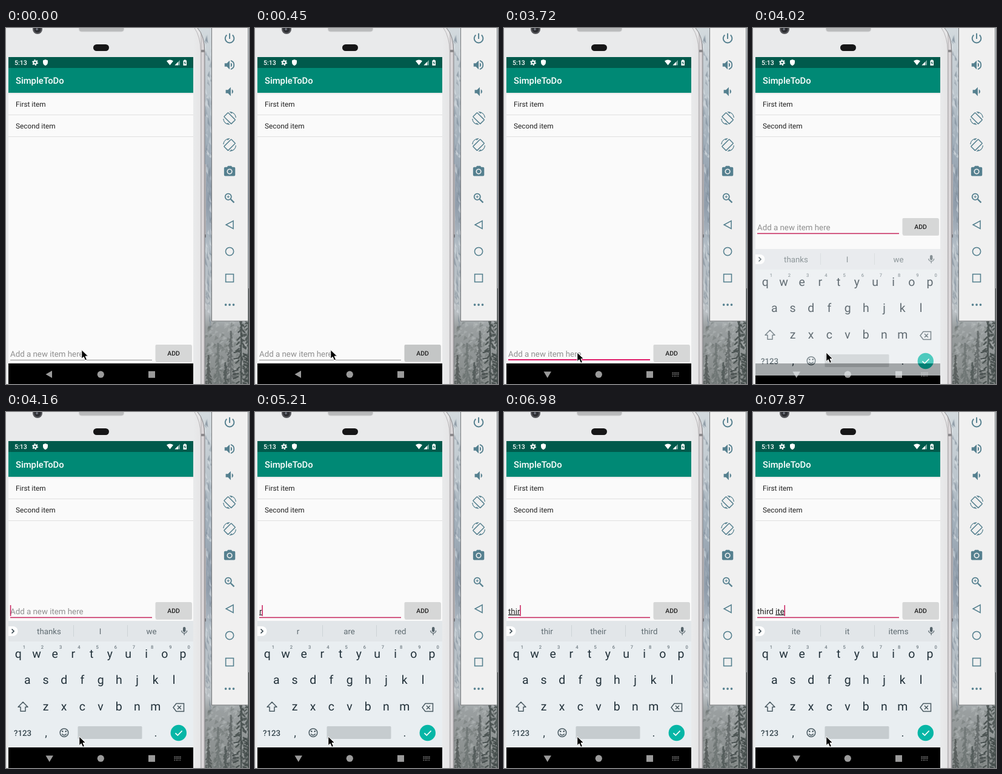
Animation of 401 by 588 pixels, one loop 8 s. Source, as an HTML page:

```html
<!DOCTYPE html>
<html lang="en">
<head>
<meta charset="utf-8">
<title>SimpleToDo</title>
<style>
html, body { margin: 0; width: 100%; height: 100%; overflow: hidden; background: #e9eaeb; }
svg { display: block; width: 401px; height: 588px; font-family: Roboto, "Noto Sans", sans-serif; }
text { white-space: pre; text-rendering: geometricPrecision; }
.mid { text-anchor: middle; }
.line { fill: none; }
.line:not([stroke-width]) { stroke-width: 1.7; }
#tools { fill: #55808f; }
#tools .line { fill: none; stroke: #55808f; }
</style>
</head>
<body>
<svg viewBox="0 0 401 588" xmlns="http://www.w3.org/2000/svg">
  <defs>
    <linearGradient id="rock" x1="0" y1="0" x2="0" y2="1">
      <stop offset="0" stop-color="#d3dade"/>
      <stop offset=".18" stop-color="#bcc6cd"/>
      <stop offset=".3" stop-color="#a3b0bb"/>
      <stop offset=".5" stop-color="#909dab"/>
      <stop offset=".62" stop-color="#b5bfc7"/>
      <stop offset=".8" stop-color="#b9bfc3"/>
      <stop offset=".84" stop-color="#9a9fa0"/>
      <stop offset="1" stop-color="#868b8a"/>
    </linearGradient>
    <linearGradient id="rim" x1="0" x2="1" y1="0" y2="0">
      <stop offset="0" stop-color="#e9eaeb"/>
      <stop offset=".58" stop-color="#e6e6e7"/>
      <stop offset=".7" stop-color="#c3c0c2"/>
      <stop offset=".82" stop-color="#e3dfe1"/>
      <stop offset="1" stop-color="#bdb8bb"/>
    </linearGradient>
    <linearGradient id="drop" x1="0" y1="0" x2="0" y2="1">
      <stop offset="0" stop-color="#000" stop-opacity=".09"/>
      <stop offset="1" stop-color="#000" stop-opacity="0"/>
    </linearGradient>
  </defs>

  <!-- wallpaper -->
  <rect x="300" width="101" height="588" fill="url(#rock)"/>
  <g id="snow"></g>
  <g id="trees"></g>

  <!-- phone body -->
  <path d="M327 225h3v120H327z" fill="#b9b6b9"/>
  <path d="M327 341h3v5H327z" fill="#77777b"/>
  <path d="M309 0H316Q327.500 12 328 40V588H309z" fill="url(#rim)"/>
  <path d="M316 0Q327.500 12 328 40V588" fill="none" stroke="#858487"/>
  <path d="M311 0Q321 14 321.500 40V588" fill="none" stroke="#b7b5b7"/>
  <path d="M322 38h6" stroke="#8b898c" stroke-width="4"/>
  <rect width="309" height="588" fill="#e9eaeb"/>
  <circle cx="52" cy="2" r="8" fill="#55565a"/>
  <circle cx="52" cy="2" r="5.500" fill="#2b2c30"/>
  <circle cx="51" cy="2" r="2" fill="#6b6e78"/>
  <rect x="120.500" y="-8" width="74" height="14" rx="4" fill="#b9babb" stroke="#cfcfd0"/>
  <rect x="144" y="27" width="26" height="11" rx="5.500" fill="#161617"/>

  <!-- app -->
  <rect x="4" y="48" width="305" height="540" fill="#fafafa"/>
  <rect x="4" y="107" width="305" height="3" fill="url(#drop)"/>
  <rect x="4" y="48" width="305" height="18" fill="#005a4c"/>
  <rect x="4" y="66" width="305" height="41" fill="#008975"/>
  <g fill="#fff">
    <text x="14" y="61" font-size="10.600" font-weight="500">5:13</text>
    <circle cx="48" cy="57" r="2.600" fill="none" stroke="#fff" stroke-width="2"/>
    <circle cx="48" cy="57" r="4.200" fill="none" stroke="#fff" stroke-width="1.600" stroke-dasharray="2.200 2.200"/>
    <path d="M65 52l4 1.600v3.200q0 3.600-4 5.400q-4-1.800-4-5.400v-3.200z"/>
    <path d="M265 54.500q5.500-4 11 0L270.500 61.500z"/>
    <path d="M287 53v8.500h-8.500z" opacity=".45"/>
    <path d="M284 56v5.500h-5.500z"/>
    <path d="M292.500 53.500h1.500v-1h2.500v1h1.500v8.500h-5.500z"/>
    <path d="M295.600 54.500l-2 3.500h1.400v3l2-3.600h-1.400z" fill="#005a4c"/>
    <text x="16" y="92" font-size="14.800" font-weight="500">SimpleToDo</text>
  </g>
  <g font-size="11.800" fill="#222">
    <text x="16" y="129.700">First item</text>
    <text x="16" y="166.200">Second item</text>
  </g>
  <path d="M4 143.500H309M4 179.500H309" stroke="#dfdfdf"/>

  <g id="field">
    <rect x="247" y="524" width="60" height="28" rx="2" fill="#000" opacity=".13"/>
    <rect id="add" x="246.500" y="523" width="60" height="27.500" rx="2"/>
    <text class="mid" x="276.500" y="540.800" font-size="10.500" font-weight="500" fill="#222">ADD</text>
    <rect id="rule" x="7" width="234"/>
    <text id="hint" x="7" y="542.500" font-size="13.300" fill="#8f8f8f">Add a new item here</text>
    <text id="typed" x="7" y="542.500" font-size="13.300" fill="#222"><tspan id="done"></tspan><tspan id="open" text-decoration="underline"></tspan></text>
    <rect id="caret" y="528" width="1.500" height="18" fill="#c81e5c"/>
  </g>

  <!-- navigation bar -->
  <rect x="4" y="554" width="305" height="34" fill="#000"/>
  <g fill="#9b9b9b">
    <path id="back" d="M65.500 572L76 566V578z"/>
    <path id="down" d="M65.500 567.500H78L71.700 578z"/>
    <circle cx="156.300" cy="572.200" r="5.600"/>
    <rect x="235" y="566.800" width="11" height="11"/>
    <path id="keys" d="M277.500 569.500h11.500M277.500 572h11.500M277.500 575h2m1 0h5m1 0h2" fill="none" stroke="#8a8a8a" stroke-width="1.500" stroke-dasharray="1.500 .900"/>
  </g>

  <!-- keyboard -->
  <g id="board">
    <rect x="4" y="345" width="305" height="209" fill="#e9eef1"/>
    <rect x="4" y="345" width="305" height="34" fill="#e2e6e9"/>
    <path d="M4 354h7.500a8 8 0 0 1 0 16H4z" fill="#fff"/>
    <path d="M9.500 358.500l3.500 3.500-3.500 3.500" class="line" stroke="#37474f"/>
    <path d="M111.500 352v19M200.500 352v19" stroke="#cdd3d6"/>
    <g id="tips" class="mid" font-size="13.300" fill="#5f6b71">
      <text x="71" y="366.600"></text><text x="155.500" y="366.600"></text><text x="240" y="366.600"></text>
    </g>
    <rect x="292" y="355" width="4.400" height="8.500" rx="2.200" fill="#56646b"/>
    <path d="M289.800 361a4.400 4.400 0 0 0 8.800 0M294.200 365.500v3" class="line" stroke="#56646b" stroke-width="1.300"/>
    <g id="letters" class="mid" fill="#22313a"></g>
    <g fill="#37474f">
      <text x="13" y="534.600" font-size="13.300" font-weight="500">?123</text>
      <text class="mid" x="66" y="535.500" font-size="19">,</text>
      <text class="mid" x="247" y="536" font-size="19">.</text>
      <circle cx="93.300" cy="527.500" r="1.200"/><circle cx="98.700" cy="527.500" r="1.200"/>
    </g>
    <g class="line" stroke="#4a5a62" stroke-width="1.500">
      <circle cx="96" cy="529.700" r="6.800"/>
      <path d="M92.300 531.500q3.700 4.500 7.400 0"/>
      <path d="M28 479l8 8.300h-4v7h-8v-7h-4z" stroke-linejoin="round"/>
      <path d="M281 481.500h12.500v13H281l-5-6.500zM283 485l6 6m0-6l-6 6"/>
    </g>
    <rect x="118.500" y="519" width="106" height="21" rx="1.500" fill="#c6cccf"/>
    <circle cx="284.800" cy="530" r="13.200" fill="#06b6a6"/>
    <path d="M279.500 530.300l3.800 3.800 7.300-7.600" class="line" stroke="#fff"/>
  </g>

  <!-- emulator controls -->
  <rect x="339.500" y="-2" width="60" height="486" fill="#f0f0f0" stroke="#77797b"/>
  <g id="tools"></g>

  <path id="mouse" d="M0 0V14.800L3.400 11.700 5.900 17.400 8.700 16.200 6.200 10.600H10.800z" fill="#000" stroke="#fff" stroke-width="1"/>
</svg>
<script>
const LOOP = 8000;
const $ = id => document.getElementById(id);
const add = (id, markup) => $(id).insertAdjacentHTML("beforeend", markup);

let seed = 7;
const rand = () => (seed = seed * 16807 % 2147483647) / 2147483647;

// Snow and rock flecks
for (let i = 0; i < 110; i++) {
  const x = 328 + rand() * 12, y = rand() * 490, h = 5 + rand() * 15;
  const tone = rand() < .5 ? "#e6ebee" : "#71808e";
  add("snow", `<path d="M${x} ${y}l${rand() * 5} ${h}l-4 ${-h / 3}z" fill="${tone}" opacity="${.2 + rand() * .35}"/>`);
}
for (let i = 0; i < 160; i++) {
  const x = 328 + rand() * 73, y = 482 + rand() * 106;
  add("snow", `<path d="M${x} ${y}l5 ${6 * rand()}l-7 4z" fill="${rand() < .45 ? "#bcc1c1" : "#666d6c"}" opacity=".4"/>`);
}

// A conifer of short drooping twigs, wider towards the ground
function tree(x, top, width, color) {
  let d = `M${x} ${top}V588`;
  for (let y = top; y < 588; y += 1.6) {
    const reach = width * Math.min(1, (y - top + 6) / 90);
    const dx = (rand() * 2 - 1) * reach;
    d += `M${x + dx * .3} ${y}l${dx * .7} ${1 + rand() * 5}`;
  }
  add("trees", `<path class="line" d="${d}" stroke="${color}" stroke-width="2.2" opacity=".8"/>`);
}
tree(350, 520, 12, "#6b7271");
tree(371, 500, 14, "#5e6564");
tree(334, 540, 12, "#4d5453");
tree(388, 462, 17, "#3d4544");
tree(400, 430, 10, "#434b4a");
tree(362, 552, 18, "#4a5251");

// Letter keys
[["qwertyuiop", 20.3, 405.5], ["asdfghjkl", 35.4, 449.3], ["zxcvbnm", 65.5, 493.2]].forEach(([row, x0, y], r) => {
  [...row].forEach((key, i) => {
    const x = x0 + i * 30.2;
    add("letters", `<text x="${x}" y="${y}" font-size="19.500">${key}</text>`);
    if (!r) add("letters", `<text x="${x + 9.5}" y="391.300" font-size="7.600" fill="#4f5d65">${(i + 1) % 10}</text>`);
  });
});

// Controls, drawn on a 24 unit grid
const cone = "M3 9v6h4l5 5V4L7 9z", near = "M14 8v8q2.500-1.300 2.500-4T14 8z";
const turn = `<rect class="line" x="2.800" y="6.800" width="18.400" height="10.400" rx=".8" transform="rotate(45 12 12)" stroke-width="1.600"/>
  <path d="M12 0A12 12 0 0 1 24 11H22.500A10 10 0 0 0 16.500 2.500L15.200 3.800 11.300 0zM12 24A12 12 0 0 1 0 13H1.500A10 10 0 0 0 7.500 21.500L8.800 20.200 12.700 24z"/>`;
const tools = [
  `<path class="line" stroke-width="2.100" d="M12 3v10M6.900 5.900a8 8 0 1 0 10.200 0"/>`,
  `<path d="${cone}${near}"/><path class="line" stroke-width="2" d="M14 4.300a8 8 0 0 1 0 15.400"/>`,
  `<path transform="translate(2)" d="${cone}${near}"/>`,
  turn,
  `<g transform="matrix(-1 0 0 1 24 0)">${turn}</g>`,
  `<path fill-rule="evenodd" d="M9 2L7.200 4H4a2 2 0 0 0-2 2v12a2 2 0 0 0 2 2h16a2 2 0 0 0 2-2V6a2 2 0 0 0-2-2h-3.200L15 2zM12 7a5 5 0 0 1 0 10a5 5 0 0 1 0-10z"/><circle cx="12" cy="12" r="3.200"/>`,
  `<circle class="line" cx="9.500" cy="9.500" r="5.500" stroke-width="2"/><path class="line" d="M14 14l6 6" stroke-width="2.400"/><path class="line" d="M9.500 7v5M7 9.500h5" stroke-width="1.200"/>`,
  `<path class="line" d="M18.500 5v14L5.500 12z"/>`,
  `<circle class="line" cx="12" cy="12" r="7.200"/>`,
  `<rect class="line" x="5" y="5" width="14" height="14"/>`,
  `<circle cx="5" cy="12" r="2"/><circle cx="12" cy="12" r="2"/><circle cx="19" cy="12" r="2"/>`
];
tools.forEach((art, i) => add("tools", `<g transform="translate(358 ${6 + i * 44}) scale(.92)">${art}</g>`));

// Each track lists [start, ...values]
const mouse = [[0, 124.8, 531.5], [2390, 124.8, 532.5], [2540, 122, 534.5], [2680, 120.2, 536], [2830, 120.8, 536]];
const button = [[0, "#d6d7d7"], [450, "#c4c6c6"], [2980, "#d6d7d7"]];
const rule = [[0, "#8c8c8c", 548, 1], [2980, "#df1a68", 547, 2], [3870, "#c42259", 547.7, 1.5]];
const board = [[0, 0, 0], [4020, .7, 20], [4160, 1, 0]];
const caret = [[0, 0], [2980, 1], [3720, 0], [4160, 1], [4760, 0], [5210, 1], [6540, 0], [6830, 1]];
const typed = [[0, "", ""], [5210, "", "r"], [5650, "", ""], [5940, "", "t"], [6830, "", "th"], [6980, "", "thir"],
  [7280, "", "third"], [7430, "third ", ""], [7580, "third ", "i"], [7720, "third ", "it"], [7870, "third ", "ite"]];
const tips = [[0, "thanks", "I", "we"], [5210, "r", "are", "red"], [5790, "thanks", "I", "we"], [5940, "t", "thanks", "thank"],
  [6830, "th", "thanks", "thank"], [6980, "thir", "their", "third"], [7280, "third", "thirdly", "bird"],
  [7430, "of", "one", "day"], [7720, "it", "is", "its"], [7870, "ite", "it", "items"]];

const at = (track, t) => track.findLast(step => step[0] <= t).slice(1);
const set = (id, attrs) => { for (const k in attrs) $(id).setAttribute(k, attrs[k]); };
const show = (id, on) => $(id).style.visibility = on ? "visible" : "hidden";
const write = (node, s) => { if (node.textContent !== s) node.textContent = s; };

function draw(t) {
  const [mx, my] = at(mouse, t);
  set("mouse", { transform: `translate(${mx} ${my})` });
  set("add", { fill: at(button, t)[0] });
  const [fill, y, height] = at(rule, t);
  set("rule", { fill, y, height });
  set("field", { transform: `translate(0 ${t < 3870 ? 0 : -209})` });

  const [opacity, drop] = at(board, t);
  set("board", { opacity, transform: `translate(0 ${drop})` });
  show("back", t < 3720);
  show("down", t >= 3720);
  show("keys", t >= 3720);

  const [done, open] = at(typed, t);
  write($("done"), done);
  write($("open"), open);
  show("hint", !(done + open));
  set("caret", { x: 6.8 + (done + open ? $("typed").getComputedTextLength() : 0) });
  show("caret", at(caret, t)[0]);
  at(tips, t).forEach((word, i) => write($("tips").children[i], word));
}

const start = performance.now();
function tick() {
  draw((performance.now() - start) % LOOP);
  requestAnimationFrame(tick);
}
tick();
</script>
</body>
</html>
```
